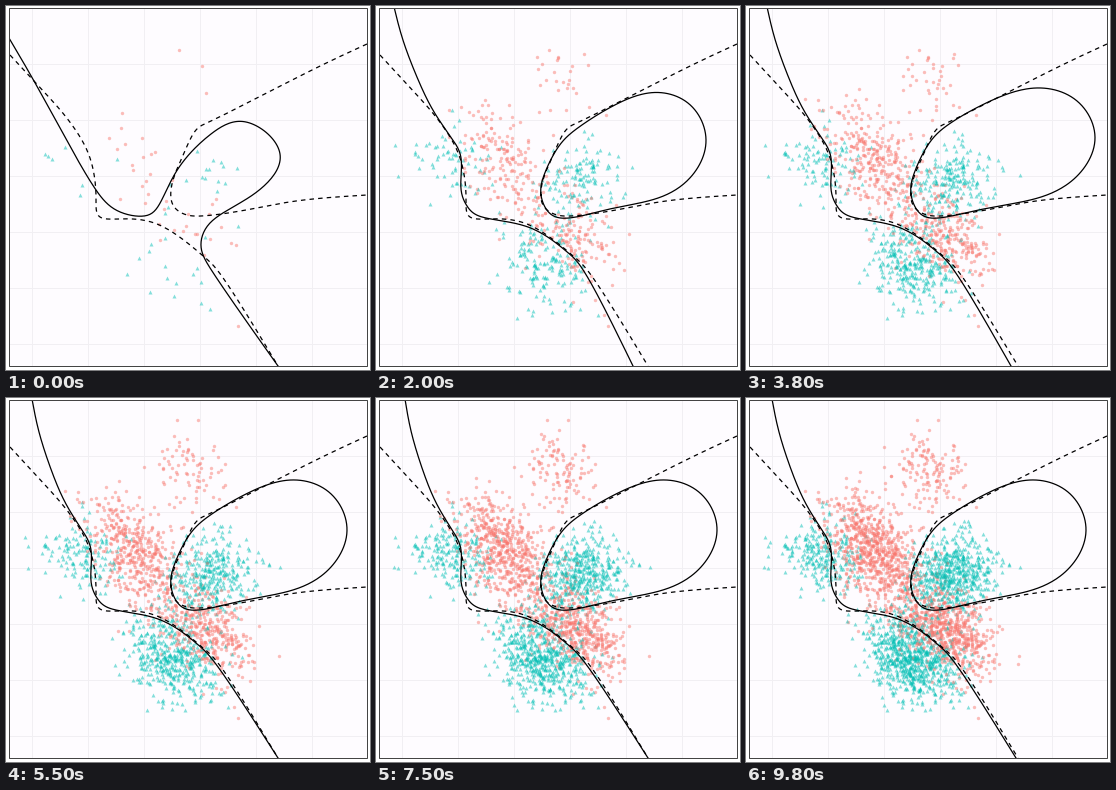
A matplotlib script that plays this animation: 364x364 px, repeating every 10 s.

```python
import numpy as np
import matplotlib.pyplot as plt
from matplotlib.animation import FuncAnimation
from matplotlib.patches import Rectangle

SIZE, DPI = 364, 100
PX = 72 / DPI
STATES, PER_CLASS, SPREAD = 40, 40, 18.5
LEFT, TOP, SIDE = 2.5, 1.5, 358
RED, TEAL = "#f8766d", "#00bfb4"
rng = np.random.default_rng(11)


def smooth(pts, closed=False, n=300):
    """Natural cubic spline through the points."""
    p = np.asarray(pts, float)
    if closed:
        p = np.vstack([p[-4:], p, p[:5]])
    t = np.r_[0, np.cumsum(np.sqrt(np.hypot(*np.diff(p, axis=0).T)))]
    h = np.diff(t)
    slope = np.diff(p, axis=0) / h[:, None]
    a = np.eye(len(p))
    rhs = np.zeros_like(p)
    for i in range(1, len(p) - 1):
        a[i, i - 1:i + 2] = h[i - 1], 2 * (h[i - 1] + h[i]), h[i]
        rhs[i] = 6 * (slope[i] - slope[i - 1])
    m = np.linalg.solve(a, rhs)
    u = np.linspace(*((t[4], t[-5]) if closed else (t[0], t[-1])), n)
    i = np.clip(np.searchsorted(t, u, side="right") - 1, 0, len(h) - 1)
    d, w = (u - t[i])[:, None], h[i][:, None]
    lean = slope[i] - w * (2 * m[i] + m[i + 1]) / 6
    return p[i] + d * (lean + d * (m[i] / 2 + d * (m[i + 1] - m[i]) / (6 * w)))


# Each class is drawn around a few segments: weight, start, end
red_groups = [(0.10, (181, 70), (185, 78)),
              (0.50, (100, 118), (156, 184)),
              (0.40, (172, 208), (226, 254))]
teal_groups = [(0.14, (60, 160), (94, 156)),
               (0.38, (186, 188), (224, 164)),
               (0.48, (144, 240), (190, 276))]


def sample(groups):
    weight, start, end = (np.array(c) for c in zip(*groups))
    pick = rng.choice(len(groups), PER_CLASS, p=weight)
    along = rng.random((PER_CLASS, 1))
    centre = start[pick] + along * (end - start)[pick]
    return centre + rng.normal(0, SPREAD, (PER_CLASS, 2))


# Decision boundaries: first fit, later fit (path and ring), ideal
joined = [(3, 32), (28, 75), (60, 133), (88, 181), (110, 204), (138, 210),
          (151, 202), (170, 166), (205, 128), (240, 116), (274, 148),
          (248, 188), (204, 217), (195, 240), (206, 265), (272, 360)]
path = [(26, 1), (33, 34), (46, 74), (60, 106), (76, 132), (85, 152),
        (85, 183), (91, 200), (103, 210), (152, 221), (190, 245),
        (206, 261), (272, 360)]
ring = [(165, 188), (169, 165), (184, 136), (203, 118), (240, 96), (285, 82),
        (324, 95), (341, 132), (325, 169), (290, 191), (240, 202),
        (200, 211), (176, 209)]
ideal_path = [(4, 49), (40, 88), (60, 111), (78, 138), (87, 163), (90, 190),
              (91, 207), (96, 212), (112, 213), (151, 218), (196, 249),
              (212, 265), (272, 360)]
ideal_fork = [(361, 38), (300, 67), (207, 114), (190, 124), (178, 147),
              (166, 178), (167, 199), (178, 208), (195, 210), (240, 204),
              (290, 195), (361, 189)]

# Poses of the fit: state, ring's right end, path's top and bottom x
poses = np.array([(0, 275, -38, 272), (4, 305, -34, 260), (8, 330, 18, 257),
                  (15, 349, 21, 265), (19, 354, 16, 270), (22, 341, 26, 272),
                  (30, 341, 29, 272), (35, 339, 37, 268), (39, 340, 26, 270)])


def boundary(k):
    if k < 2:
        return smooth(joined), np.full((1, 2), np.nan)
    right, top, bottom = (np.interp(k, poses[:, 0], c) for c in poses.T[1:])
    x, y = np.array(path, float).T
    x += (top - 26) * np.clip(1 - y / 140, 0, 1)
    x += (bottom - 272) * np.clip((y - 255) / 105, 0, 1)
    rx, ry = np.array(ring, float).T
    rx = np.where(rx > 200, 200 + (rx - 200) * (right - 200) / 141, rx)
    ry = 211 - (211 - ry) * (1 - max(0, 339 - right) / 258)
    return smooth(np.c_[x, y]), smooth(np.c_[rx, ry], closed=True)


fig = plt.figure(figsize=(SIZE / DPI, SIZE / DPI), dpi=DPI, facecolor="white")
ax = fig.add_axes([0, 0, 1, 1])
ax.set_xlim(0, SIZE)
ax.set_ylim(SIZE, 0)
ax.axis("off")

panel = Rectangle((LEFT, TOP), SIDE, SIDE, fc="#fefcff", ec="none", zorder=0)
ax.add_patch(panel)


def draw(pts, *fmt, **style):
    art, = ax.plot(*np.transpose(pts), *fmt, **style)
    art.set_clip_path(panel)
    return art


for j in range(6):
    x, y = 25.5 + 56 * j, 57.5 + 56 * j
    for ends in ([(x, 0), (x, SIZE)], [(0, y), (SIZE, y)]):
        draw(ends, color="#f1eff3", lw=PX, zorder=1)

dot = dict(mew=0, alpha=0.48, zorder=2)
batches = [(draw(sample(teal_groups), "^", color=TEAL, ms=4 * PX, **dot),
            draw(sample(red_groups), "o", color=RED, ms=3.4 * PX, **dot))
           for _ in range(STATES)]

ink = dict(color="black", lw=1.25 * PX, zorder=4)
for pts in (ideal_path, ideal_fork):
    draw(smooth(pts), ls=(0, (3.6, 3.3)), dash_capstyle="butt", **ink)
solid = [draw([(0, 0)], **ink) for _ in range(2)]
ax.add_patch(Rectangle((LEFT, TOP), SIDE, SIDE, fc="none", ec="#444444",
                       lw=PX, zorder=5))


def update(i):
    # Two states every half second, held 300 ms and 200 ms
    k = 2 * (i // 5) + (i % 5 >= 3)
    for n, pair in enumerate(batches):
        for art in pair:
            art.set_visible(n <= k)
    for art, pts in zip(solid, boundary(k)):
        art.set_data(*pts.T)
    return solid


anim = FuncAnimation(fig, update, frames=100, interval=100, repeat=True,
                     repeat_delay=0, blit=False)
plt.show()
```
